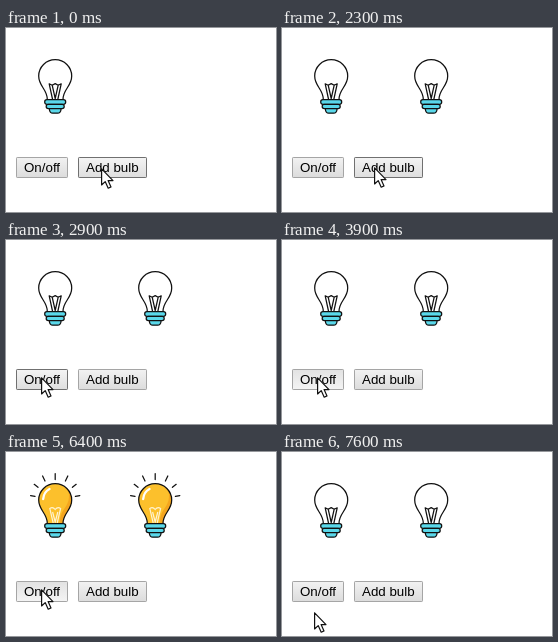
An HTML page that plays this animation: 270x184 px, repeating every 9300 ms.

```html
<!DOCTYPE html>
<html lang="en">
<head>
<meta charset="utf-8">
<title>Light bulbs</title>
<style>
  html, body { margin: 0; width: 100%; height: 100%; overflow: hidden; background: #fff; }
  svg { display: block; width: 270px; height: 184px; }
  text { font: 13.333px "Liberation Sans", Arial, sans-serif; fill: #000; }
  .button rect { fill: url(#face); stroke: #a5a5a5; }
  .button.hover rect { fill: url(#faceHover); stroke: #707070; }
  .button.pressed rect { fill: url(#facePressed); stroke: #a5a5a5; }
  .line { fill: none; stroke: #111; stroke-width: 1.25; stroke-linecap: round; stroke-linejoin: round; }
  .base { fill: #5ad8ea; }
  .lit { display: none; }
  .on .lit { display: inline; }
  .on .unlit { display: none; }
</style>
</head>
<body>
<svg viewBox="0 0 270 184">
  <defs>
    <linearGradient id="face" x2="0" y2="1">
      <stop stop-color="#f2f2f2"/><stop offset="1" stop-color="#dcdcdc"/>
    </linearGradient>
    <linearGradient id="faceHover" x2="0" y2="1">
      <stop stop-color="#f4f4f4"/><stop offset="1" stop-color="#dedede"/>
    </linearGradient>
    <linearGradient id="facePressed" x2="0" y2="1">
      <stop stop-color="#e2e2e2"/><stop offset="1" stop-color="#f4f4f4"/>
    </linearGradient>
    <path id="glass" d="M41.3 71.5C41.3 61 32.7 58.5 32.7 48A16.5 16.3 0 0 1 65.7 48C65.7 58.5 57 61 57 71.5Z"/>
    <path id="filament" d="M47.2 71L43.8 56.5Q46.8 54.5 49.2 57.5Q51.6 54.5 54.6 56.5L51.2 71M46.6 60L49.2 70L51.8 60"/>
    <g id="bulb">
      <g class="unlit">
        <use href="#glass" class="line"/>
        <path class="line" d="M46.6 71.5L43.2 55.8L46.2 57.2L49.2 55.6L52.2 57.2L55.2 55.8L51.8 71.5M46.2 57.2L49.2 70.5L52.2 57.2"/>
      </g>
      <g class="lit">
        <use href="#glass" fill="#fcc02c"/>
        <path fill="#f4a51f" d="M59.5 35.3C65 41 63.5 50 58.5 56.5C55 61 53.7 66 53.5 71.5H57C57 61 65.7 58.5 65.7 48Q65.7 39.5 59.5 35.3Z"/>
        <path d="M37.2 47Q37.8 40 43.5 37" fill="none" stroke="#fff" stroke-width="2.3" stroke-linecap="round"/>
        <use href="#filament" fill="none" stroke="#fff3d0" stroke-width="1.2"/>
        <use href="#glass" class="line"/>
        <path class="line" d="M49.2 21.5V27.5M36.6 24L39 29M61.8 24L59.4 29M28.2 32.3L32 35.3M70.2 32.3L66.4 35.3M24.6 43.6L29 44.4M73.8 43.6L69.4 44.4"/>
      </g>
      <g class="line">
        <rect class="base" x="38.7" y="71.7" width="21" height="4.6" rx="2.2"/>
        <rect class="base" x="40.2" y="76.3" width="18" height="4.4" rx="2.1"/>
        <path class="base" d="M43.3 80.7H55.1Q54.8 85.2 51.6 85.2H46.8Q43.6 85.2 43.3 80.7Z"/>
      </g>
    </g>
  </defs>
  <g id="bulbs">
    <use href="#bulb"/>
    <use href="#bulb" x="100" id="second"/>
  </g>
  <g class="button" id="toggle">
    <rect x="10.5" y="129.5" width="51" height="20" rx=".7"/>
    <text x="18" y="144">On/off</text>
  </g>
  <g class="button" id="add">
    <rect x="72.5" y="129.5" width="68" height="20" rx=".7"/>
    <text x="80" y="144">Add bulb</text>
  </g>
  <path id="pointer" d="M.6 .8V17L4.2 13.6L7.2 20.2L10 18.9L7.1 12.6H12Z" fill="#fff" stroke="#111" stroke-width="1.2" stroke-linejoin="round"/>
</svg>
<script>
  const LOOP = 9300, STEP = 100;
  const byId = id => document.getElementById(id);
  const [bulbs, second, toggle, add, pointer] =
    ["bulbs", "second", "toggle", "add", "pointer"].map(byId);

  // Pointer stops: [time, x, y]
  const path = [
    [0, 95, 140],
    [2300, 92, 139], [2400, 84, 138], [2500, 73, 137], [2600, 61, 136],
    [2700, 49, 136], [2800, 40, 137], [2900, 35, 137],
    [7100, 34, 141], [7200, 33, 146], [7300, 32, 151],
    [7400, 32, 156], [7500, 32, 159], [7600, 32, 160]
  ];
  const litParts = [...document.querySelectorAll(".lit")];
  const unlitParts = [...document.querySelectorAll(".unlit")];

  const during = (t, from, to) => t >= from && t < to;

  function paintButton(button, left, right, x, y, pressed) {
    const over = x >= left && x < right && y >= 129 && y < 150;
    button.setAttribute("class", "button" + (pressed ? " pressed" : over ? " hover" : ""));
  }

  function draw(now) {
    const t = Math.floor((now % LOOP) / STEP) * STEP;
    const [, x, y] = path.filter(stop => stop[0] <= t).pop();
    const on = during(t, 4000, 6500);
    pointer.setAttribute("transform", `translate(${x} ${y})`);
    second.style.display = t >= 1200 ? "inline" : "none";
    litParts.forEach(part => part.style.display = on ? "inline" : "none");
    unlitParts.forEach(part => part.style.display = on ? "none" : "inline");
    paintButton(toggle, 10, 62, x, y, during(t, 3900, 4000) || during(t, 6400, 6500));
    paintButton(add, 72, 141, x, y, during(t, 1100, 1200));
  }

  const start = performance.now();
  function tick() {
    draw(performance.now() - start);
    requestAnimationFrame(tick);
  }
  tick();
</script>
</body>
</html>
```
